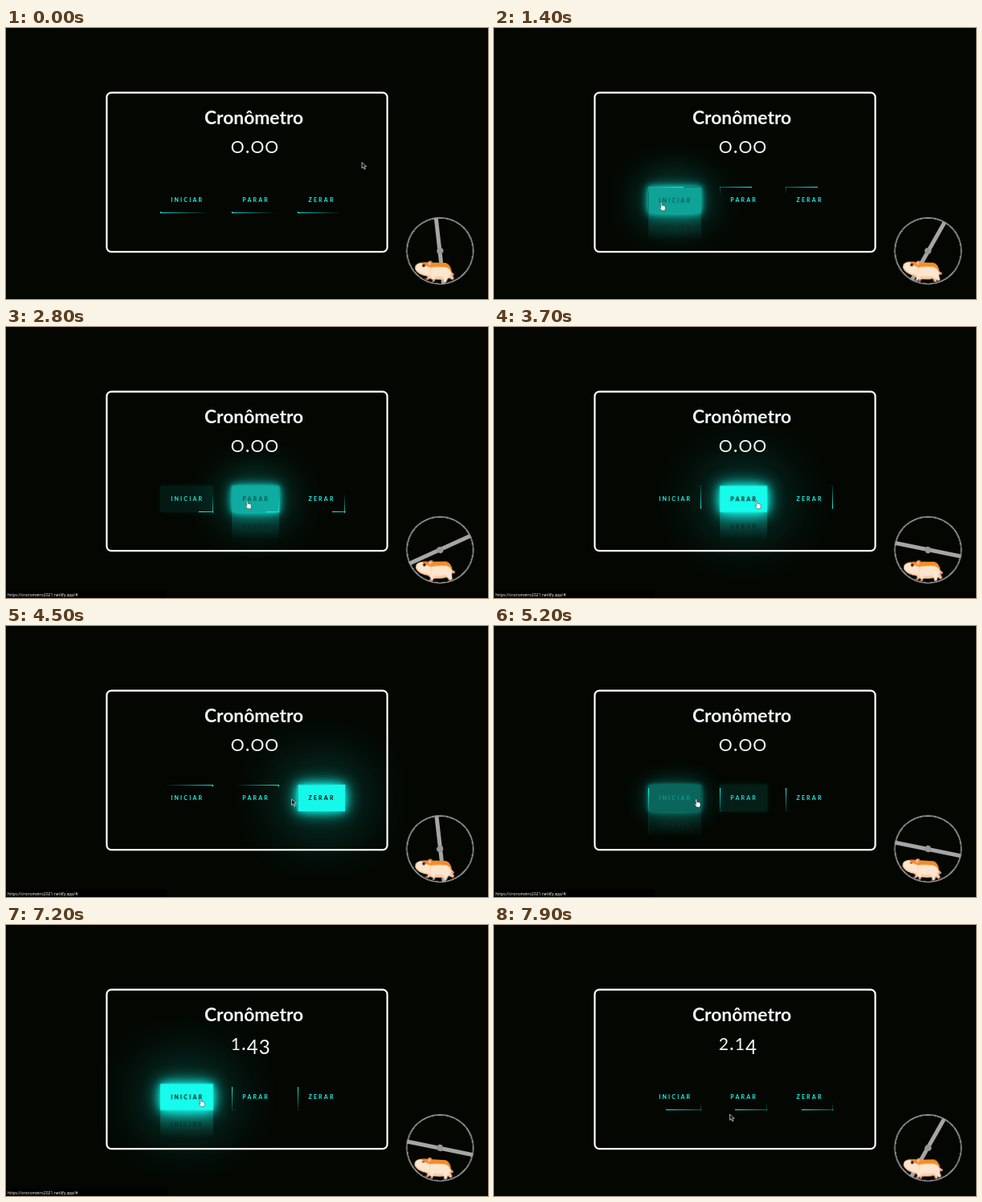
These frames come from a looping animation (600 px wide and 338 px high, 8 s). An HTML page:

```html
<!DOCTYPE html>
<html lang="pt-BR">
<head>
<meta charset="utf-8">
<title>Cronômetro</title>
<style>
html, body { margin: 0; width: 100%; height: 100%; overflow: hidden; background: #040601; }
#stage { position: absolute; left: 0; top: 0; width: 1366px; height: 770px; overflow: hidden;
  transform: scale(.43924); transform-origin: 0 0; background: #040601; }
svg { position: absolute; left: 0; top: 0; font-family: Lato, sans-serif; font-variant-numeric: lining-nums; }

.button { --h: 0; --glow: rgb(23 251 236 / var(--h)); position: absolute; top: 451px; height: 75px; overflow: hidden;
  box-sizing: border-box; padding-left: 30px; white-space: nowrap;
  font: 700 16px/75px Lato, sans-serif; letter-spacing: 5px;
  color: color-mix(in srgb, #050801 calc(var(--h) * 100%), #17fbec);
  background: var(--glow);
  box-shadow: 0 0 calc(5px * var(--h)) var(--glow), 0 0 calc(25px * var(--h)) var(--glow),
    0 0 calc(50px * var(--h)) var(--glow), 0 0 calc(200px * var(--h)) var(--glow); }
.button.hover { -webkit-box-reflect: below 1px linear-gradient(transparent, #0005); }
.button i { position: absolute; animation: 1s linear infinite paused; }
.button i:nth-of-type(odd) { left: 0; width: 100%; height: 2px; }
.button i:nth-of-type(even) { top: 0; width: 2px; height: 100%; }
.button i:nth-of-type(1) { top: 0; background: linear-gradient(90deg, transparent, #17fbec); animation-name: right; }
.button i:nth-of-type(2) { right: 0; background: linear-gradient(180deg, transparent, #17fbec); animation-name: down; animation-delay: .25s; }
.button i:nth-of-type(3) { bottom: 0; background: linear-gradient(270deg, transparent, #17fbec); animation-name: left; animation-delay: .5s; }
.button i:nth-of-type(4) { left: 0; background: linear-gradient(0deg, transparent, #17fbec); animation-name: up; animation-delay: .75s; }
@keyframes right { 0% { transform: translateX(-100%); } 50%, 100% { transform: translateX(100%); } }
@keyframes down { 0% { transform: translateY(-100%); } 50%, 100% { transform: translateY(100%); } }
@keyframes left { 0% { transform: translateX(100%); } 50%, 100% { transform: translateX(-100%); } }
@keyframes up { 0% { transform: translateY(100%); } 50%, 100% { transform: translateY(-100%); } }

#wheel { --fur: hsl(30 90% 55%); --mid: hsl(30 90% 80%); --light: hsl(30 90% 90%);
  --pink: hsl(0 90% 85%); --rose: hsl(0 90% 75%);
  position: absolute; left: 1133.5px; top: 537px; width: 12em; height: 12em; font-size: 16px; }
#wheel div { position: absolute; }
.rim, .spoke { inset: 0; border-radius: 50%; }
.rim { background: radial-gradient(100% 100% at center, hsl(0 0% 60% / 0) 47.8%, hsl(0 0% 60%) 48%); z-index: 2; }
.spoke { animation: spin 1s linear infinite paused;
  background: radial-gradient(100% 100% at center, hsl(0 0% 60%) 4.8%, hsl(0 0% 60% / 0) 5%),
    linear-gradient(hsl(0 0% 55% / 0) 46.9%, hsl(0 0% 65%) 47% 52.9%, hsl(0 0% 65% / 0) 53%) 50% 50% / 99% 99% no-repeat; }
.hamster { top: 50%; left: calc(50% - 3.5em); width: 7em; height: 3.75em; transform-origin: 50% 0; z-index: 1;
  animation: tilt 1s ease-in-out infinite paused; }
.wag { animation: wag 1s ease-in-out infinite paused; }
.body { --a: 0deg; --b: -2deg; top: .25em; left: 2em; width: 4.5em; height: 3em;
  transform-origin: 17% 50%; transform-style: preserve-3d; background: var(--light);
  border-radius: 50% 30% 50% 30% / 15% 60% 40% 40%;
  box-shadow: .1em .75em 0 var(--fur) inset, .15em -.5em 0 var(--mid) inset; }
.head { --a: 0deg; --b: 8deg; top: 0; left: -2em; width: 2.75em; height: 2.5em; transform-origin: 100% 50%;
  background: var(--fur); border-radius: 70% 30% 0 100% / 40% 25% 25% 60%;
  box-shadow: 0 -.25em 0 var(--mid) inset, .75em -1.55em 0 var(--light) inset; }
.ear { --a: 0deg; --b: 12deg; top: -.25em; right: -.25em; width: .75em; height: .75em; transform-origin: 50% 75%;
  background: var(--pink); border-radius: 50%; box-shadow: -.25em 0 var(--fur) inset; }
.eye { top: .375em; left: 1.25em; width: .5em; height: .5em; border-radius: 50%; background: #000;
  animation: blink 1s linear infinite paused; }
.nose { top: .75em; left: 0; width: .2em; height: .25em; background: var(--rose);
  border-radius: 35% 65% 85% 15% / 70% 50% 50% 30%; }
.limb { animation-timing-function: linear; }
.front { top: 2em; left: .5em; width: 1em; height: 1.5em; transform-origin: 50% 0;
  background: linear-gradient(var(--skin) 80%, var(--paw) 80%);
  clip-path: polygon(0 0, 100% 0, 70% 80%, 60% 100%, 0 100%, 40% 80%); }
.back { top: 1em; left: 2.8em; width: 1.5em; height: 2.5em; transform-origin: 50% 30%; border-radius: .75em .75em 0 0;
  background: linear-gradient(var(--skin) 90%, var(--paw) 90%);
  clip-path: polygon(0 0, 100% 0, 100% 30%, 70% 90%, 70% 100%, 30% 100%, 40% 90%, 0 30%); }
.far { --z: -1px; --skin: var(--mid); --paw: var(--rose); }
.near { --skin: var(--light); --paw: var(--pink); }
.front.far { --a: 50deg; --b: -30deg; }
.front.near { --a: -30deg; --b: 50deg; }
.back.far { --a: -60deg; --b: 20deg; }
.back.near { --a: 20deg; --b: -60deg; }
.tail { --a: 30deg; --b: 10deg; --z: -1px; top: 1.5em; right: -.5em; width: 1em; height: .5em;
  transform-origin: .25em .25em; background: var(--pink); border-radius: .25em 50% 50% .25em;
  box-shadow: 0 -.2em 0 var(--rose) inset; }
@keyframes spin { to { transform: rotate(-1turn); } }
@keyframes tilt {
  from, to { transform: rotate(4deg) translate(-.8em, 1.85em); }
  50% { transform: rotate(0deg) translate(-.8em, 1.85em); }
}
@keyframes wag {
  from, 25%, 50%, 75%, to { transform: rotate(var(--a)) translateZ(var(--z, 0px)); }
  12.5%, 37.5%, 62.5%, 87.5% { transform: rotate(var(--b)) translateZ(var(--z, 0px)); }
}
@keyframes blink { from, 90%, to { transform: scaleY(1); } 95% { transform: scaleY(0); } }
</style>
</head>
<body>
<div id="stage">
  <div class="button" style="left:437px;width:150px">INICIAR<i></i><i></i><i></i><i></i></div>
  <div class="button" style="left:640px;width:134px">PARAR<i></i><i></i><i></i><i></i></div>
  <div class="button" style="left:827px;width:134px">ZERAR<i></i><i></i><i></i><i></i></div>
  <div id="wheel">
    <div class="rim"></div>
    <div class="hamster">
      <div class="body wag">
        <div class="head wag">
          <div class="ear wag"></div>
          <div class="eye"></div>
          <div class="nose"></div>
        </div>
        <div class="front far limb wag"></div>
        <div class="front near limb wag"></div>
        <div class="back far limb wag"></div>
        <div class="back near limb wag"></div>
        <div class="tail wag"></div>
      </div>
    </div>
    <div class="spoke"></div>
  </div>
  <svg width="1366" height="770" viewBox="0 0 1366 770">
    <rect x="285.5" y="183.5" width="795" height="452" rx="13" fill="none" stroke="#fff" stroke-width="5"/>
    <text x="702.5" y="273" text-anchor="middle" font-size="52" font-weight="700" fill="#f4fbfa">Cronômetro</text>
    <text id="clock" x="637" y="356" letter-spacing="2.3" fill="#f4fbfa"></text>
    <g id="status">
      <rect y="749" width="455" height="21" fill="#000"/>
      <text x="4" y="764" font-family="Open Sans, sans-serif" font-size="11.5" fill="#fff">https://cronometro2021.netlify.app/#</text>
    </g>
    <g id="cursor">
      <path id="arrow" d="M0 0v17l4-4 3 7 3-1-3-7h6z" fill="#111" stroke="#fff" stroke-width="1.4"/>
      <path id="hand" d="M-2 1a2 2 0 0 1 4 0v6l8 2q2 .5 2 3v4q0 3-2 6h-8l-7-9q1-2 5 1z" fill="#fff" stroke="#111"/>
    </g>
  </svg>
</div>
<script>
const LOOP = 8000, PHASE = 768, FADE = 500, SCALE = 600 / 1366;
const $ = id => document.getElementById(id);
const buttons = [...document.querySelectorAll('.button')];
const animations = document.getAnimations();

// Times at which the pointer enters and leaves each button.
const hovers = [
  [[1215, 2465], [5080, 7400]],
  [[2600, 3760], [4620, 4900]],
  [[3850, 4490]]
];

// Pointer tip: time, x, y.
const path = [
  [0, 443, 167.5], [1000, 443, 167.5], [1130, 345, 180], [1215, 258, 201], [1400, 208, 218],
  [2300, 215, 219], [2465, 258, 218], [2600, 281, 217], [2800, 300, 217], [3600, 305, 217],
  [3760, 340, 217], [3850, 363, 218], [4000, 385, 217], [4400, 380, 217], [4490, 363, 216],
  [4500, 355.5, 216], [4620, 340, 216], [4900, 281, 216], [5080, 258, 216], [5400, 241, 217],
  [6000, 241, 217], [6400, 242, 217], [7250, 242, 217], [7400, 246, 231], [7600, 275, 239],
  [7900, 293.5, 236], [LOOP, 293.5, 236]
];

const clamp = x => Math.min(1, Math.max(0, x));

// CSS "ease": cubic-bezier(.25, .1, .25, 1)
function ease(x) {
  let lo = 0, hi = 1;
  for (let i = 0; i < 20; i++) {
    const s = (lo + hi) / 2;
    if (.75 * s * (1 - s) + s ** 3 < x) lo = s; else hi = s;
  }
  const s = (lo + hi) / 2;
  return .3 * s * (1 - s) ** 2 + 3 * s * s * (1 - s) + s ** 3;
}

const fade = (t, from) => t <= from ? 0 : t >= from + FADE ? 1 : ease(clamp((t - from) / FADE));

const hoverLevel = (t, spans) => Math.max(...spans.map(([enter, leave]) =>
  fade(Math.min(t, leave), enter) * (1 - fade(t, leave))));

function pointerAt(t) {
  const i = Math.max(1, path.findIndex(p => p[0] > t));
  const [t0, x0, y0] = path[i - 1], [t1, x1, y1] = path[i];
  const u = (t - t0) / (t1 - t0);
  return [x0 + (x1 - x0) * u, y0 + (y1 - y0) * u];
}

// Old-style figures: low round ones, descending ones, tall ones.
function figures(text) {
  let shift = 0;
  return [...text].map(c => {
    const low = '012'.includes(c), drop = '34579'.includes(c) ? 10 : 0;
    const dy = drop - shift;
    shift = drop;
    const glyph = c === '0' ? 'O' : c;
    return `<tspan dy="${dy}" font-size="${low ? 48 : 55}">${glyph}</tspan>`;
  }).join('');
}

function render(t) {
  for (const a of animations) a.currentTime = 10000 + PHASE + t;

  let hovering = false;
  buttons.forEach((b, i) => {
    const over = hovers[i].some(([enter, leave]) => t >= enter && t < leave);
    hovering ||= over;
    b.style.setProperty('--h', hoverLevel(t, hovers[i]).toFixed(4));
    b.classList.toggle('hover', over);
  });

  const seconds = t < 5782 ? 0 : .22 + (t - 6000) * .0010105;
  $('clock').innerHTML = figures(Math.max(0, seconds).toFixed(2));

  const [x, y] = pointerAt(t);
  $('cursor').setAttribute('transform', `translate(${x / SCALE} ${y / SCALE})`);
  $('arrow').style.display = hovering ? 'none' : '';
  $('hand').style.display = hovering ? '' : 'none';
  $('status').style.display = t >= 1500 && t < 7700 ? '' : 'none';
}

let start;
function tick(now) {
  start ??= now;
  render((now - start) % LOOP);
  requestAnimationFrame(tick);
}
render(0);
requestAnimationFrame(tick);
</script>
</body>
</html>
```
